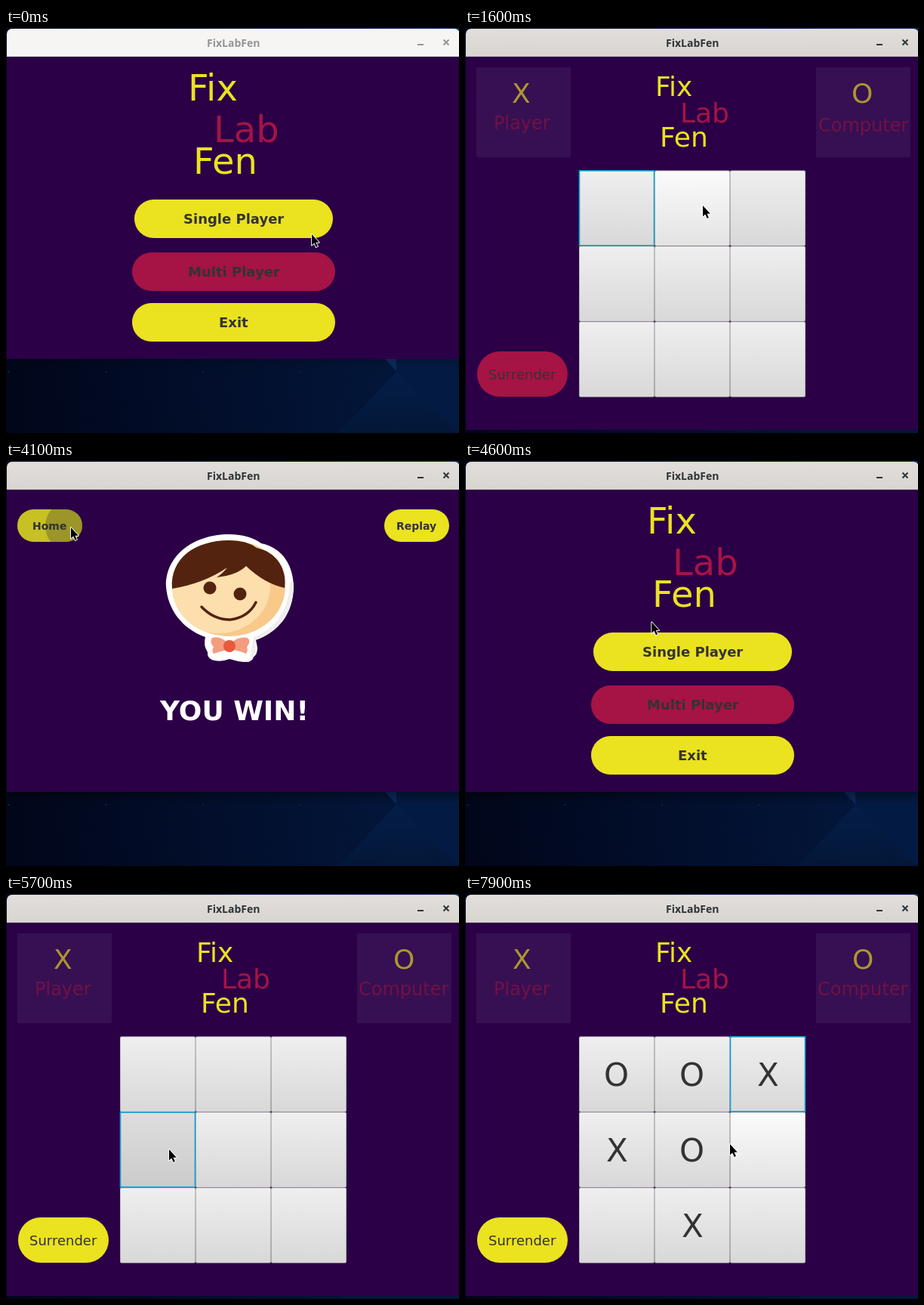
These frames come from a looping animation (600 px wide and 536 px high, 8 s). An HTML page with a canvas:

```html
<!DOCTYPE html>
<html lang="en">
<head>
<meta charset="utf-8">
<title>FixLabFen</title>
<style>
html, body { margin: 0; width: 100%; height: 100%; overflow: hidden; background: #010a20; }
canvas { display: block; width: 600px; height: 536px; }
</style>
</head>
<body>
<canvas id="stage" width="600" height="536"></canvas>
<script>
const c = document.getElementById('stage').getContext('2d');
const LOOP = 8000, STEP = 100;
const YELLOW = '#ebe220', RED = '#a61345', INK = '#333333', PURPLE = '#2b0047';
const WORDS = ['Fix', 'Lab', 'Fen'];
const SANS = '"DejaVu Sans", sans-serif';

// Pointer stops: time, x, y
const POINTER = [
  [0, 404, 271], [200, 394, 258], [600, 394, 258], [1000, 326, 228], [1300, 320, 226],
  [1600, 314, 233], [1900, 214, 250], [2000, 214, 262], [2100, 215, 289], [2400, 400, 437],
  [2700, 400, 437], [3100, 311, 372], [3400, 311, 372], [4000, 85, 86], [4300, 85, 86],
  [4700, 300, 253], [4900, 300, 253], [5200, 295, 296], [5400, 295, 296], [5700, 215, 336],
  [6100, 215, 336], [6500, 290, 432], [6700, 290, 432], [7000, 264, 432], [7100, 258, 429],
  [7200, 258, 429], [7500, 394, 240], [7700, 394, 240], [7900, 350, 329], [8000, 350, 329]
];
const SCENES = [
  [0, menu], [600, levels], [1400, game1], [3300, win],
  [4200, menu], [4900, levels], [5500, game2]
];
// Moves: time, cell, mark
const GAME1 = [[2000, 0, 'X'], [2100, 1, 'O'], [2700, 8, 'X'], [2800, 2, 'O']];
const GAME2 = [[5800, 3, 'X'], [5900, 0, 'O'], [6700, 7, 'X'], [6800, 1, 'O'], [7700, 2, 'X'], [7800, 4, 'O']];
// Cell presses: time, cell
const PRESS1 = [[1900, 0], [2600, 8], [3200, 4]];
const PRESS2 = [[5700, 3], [6600, 7], [7600, 2]];
// Pill presses: start, end
const TAPS = [[400, 600], [1200, 1400], [4000, 4200], [4700, 4900], [5300, 5500]];

let now = 0, mouse = { x: 0, y: 0 };

function pointerAt(t) {
  const i = Math.max(1, POINTER.findIndex(p => p[0] > t));
  const [t0, x0, y0] = POINTER[i - 1], [t1, x1, y1] = POINTER[i];
  const k = (t - t0) / (t1 - t0);
  return { x: x0 + (x1 - x0) * k, y: y0 + (y1 - y0) * k };
}

function rect(x, y, w, h, fill) {
  c.fillStyle = fill;
  c.fillRect(x, y, w, h);
}

function round(x, y, w, h, r, fill) {
  c.fillStyle = fill;
  c.beginPath();
  c.roundRect(x, y, w, h, r);
  c.fill();
}

function disc(x, y, r, fill, ry = r) {
  c.fillStyle = fill;
  c.beginPath();
  c.ellipse(x, y, r, ry, 0, 0, 7);
  c.fill();
}

function shape(d, fill, stroke, width) {
  const p = new Path2D(d);
  if (stroke) {
    c.strokeStyle = stroke;
    c.lineWidth = width;
    c.stroke(p);
  }
  if (fill) {
    c.fillStyle = fill;
    c.fill(p);
  }
}

function text(s, x, y, size, fill, weight = '', font = SANS) {
  c.font = `${weight} ${size}px ${font}`;
  c.fillStyle = fill;
  c.fillText(s, x, y);
}

// Centred text starts on a whole pixel
function label(s, x, y, size, fill, weight = '', font = SANS) {
  c.font = `${weight} ${size}px ${font}`;
  text(s, Math.round(x - c.measureText(s).width / 2), y, size, fill, weight, font);
}

function blend(x0, y0, x1, y1, ...tones) {
  const g = c.createLinearGradient(x0, y0, x1, y1);
  tones.forEach((tone, i) => g.addColorStop(i / (tones.length - 1), tone));
  return g;
}

function fade(y0, y1, from, to) {
  return blend(0, y0, 0, y1, from, to);
}

function pill(name, x0, y0, x1, y1, fill, size = 18, weight = 'bold') {
  const w = x1 - x0, h = y1 - y0;
  round(x0, y0, w, h, h / 2, fill);
  const tap = TAPS.find(p => now >= p[0] && now < p[1]);
  const over = mouse.x > x0 && mouse.x < x1 && mouse.y > y0 && mouse.y < y1;
  if (tap && over) {
    c.save();
    c.beginPath();
    c.roundRect(x0, y0, w, h, h / 2);
    c.clip();
    rect(x0, y0, w, h, 'rgba(51,51,51,.19)');
    disc(mouse.x, mouse.y, 2 + (now - tap[0]) * .31, 'rgba(51,51,51,.3)');
    c.restore();
  }
  label(name, (x0 + x1) / 2, Math.ceil((y0 + y1) / 2 + size * .37 - .5), size, INK, weight);
}

function desktop() {
  rect(0, 0, 600, 536, blend(0, 500, 600, 440, '#01061a', '#020f2d', '#03193f'));
  rect(0, 0, 600, 12, blend(0, 0, 600, 0, '#020a20', '#0d2e66'));
  rect(517, 438, 83, 98, '#031a42');
  shape('M517 455L600 536H440Z', fade(455, 536, '#051e48', '#031738'));
  shape('M502 438H517V454Z', '#0d2b5f');
  for (let x = 3; x < 400; x += 128.6) rect(x, 454, 1.5, 1.5, '#203252');
}

function frame(bottom, active) {
  if (bottom < 500) {
    rect(1, bottom, 599, 16, fade(bottom, bottom + 16, `rgba(0,0,0,${active ? .35 : .15})`, 'rgba(0,0,0,0)'));
  }
  rect(1, 38, 599, bottom - 38, PURPLE);
  round(1, 1, 600, 37, [7, 7, 0, 0], active ? fade(1, 38, '#e1dedb', '#d9d5d1') : '#f6f5f4');
  rect(1, 37, 599, 1, active ? '#c4beb8' : '#dedbd7');
  const ink = active ? '#2e3436' : '#929595';
  label('FixLabFen', 301, 25, 14, ink, 'bold', '"Open Sans", sans-serif');
  rect(545, 21, 8, 2, ink);
  shape('M579.5 15.5l7 7M586.5 15.5l-7 7', null, ink, 2);
}

function logo(size, spots) {
  spots.forEach(([x, y], i) => text(WORDS[i], x, y, size, i === 1 ? RED : YELLOW));
}

function menu() {
  frame(438, now >= 400);
  logo(48, [[241, 96], [275, 151], [248, 193]]);
  pill('Single Player', 170, 227, 433, 278, YELLOW);
  pill('Multi Player', 167, 297, 436, 348, RED);
  pill('Exit', 167, 364, 436, 415, YELLOW);
}

function levels() {
  frame(438, true);
  pill('Back', 19, 52, 127, 104, YELLOW);
  text('Select Dificulty', 158, 135, 36, '#ffffff', 'bold');
  rect(168, 161, 202, 1.5, '#8d782f');
  pill('Easy', 150, 199, 418, 251, YELLOW);
  pill('Medium', 156, 271, 418, 322, RED);
  pill('Hard', 155, 347, 418, 399, YELLOW);
  rustyBot();
  tealBot();
  greenBot();
}

function rustyBot() {
  shape('M148 212L140 220L131 223M135 222L129 221M134 223L131 228', null, '#b58574', 3);
  shape('M174 219Q180 225 177 239', null, '#4a4a55', 6);
  for (let y = 221; y < 238; y += 4) rect(173, y, 8, 1, '#8d8a75');
  c.save();
  c.translate(160, 198);
  c.rotate(-.13);
  round(-11, -9, 23, 19, 2, '#8f97a8');
  rect(-12, -12, 9, 3, '#686f80');
  rect(9, -15, 2, 6, '#686f80');
  disc(5, -2, 5, '#5c4b51');
  disc(5, -2, 3, '#d93136');
  disc(-6, -2, 2, '#433e48');
  rect(-6, 5, 13, 2, '#4c5262');
  c.restore();
  shape('M148 211L172 209L173 236L146 239Z', '#66562d');
  for (let y = 213; y < 231; y += 4) rect(153, y, 8, 2.5, '#c4b52b');
  round(162, 216, 10, 13, 1, '#ab8a32');
  rect(164, 219, 6, 2, '#453d29');
  disc(167, 225, 2, '#5e4b2b');
  rect(150, 238, 5, 7, '#8b6e2e');
  rect(163, 236, 5, 9, '#8b6e2e');
  round(144, 244, 14, 5, 2, '#6c552b');
  round(161, 243, 13, 5, 2, '#6c552b');
}

function tealBot() {
  rect(158.5, 254, 1.5, 8, '#75776a');
  disc(159, 253, 1.5, '#e3c743');
  shape('M146 283L142 290V300', null, '#68b5a2', 4);
  shape('M174 285L178 279V270', null, '#d94b40', 4);
  rect(140, 299, 5, 5, '#c54a43');
  rect(175, 265, 5, 5, '#64b29f');
  round(147, 261, 25, 18, 2, '#56b7a0');
  for (const x of [154, 165]) {
    disc(x, 268, 4, '#e55343');
    disc(x, 268, 2, '#ffe9c4');
  }
  rect(152, 274, 15, 2, '#1f6862');
  rect(155, 278, 9, 3, '#337d74');
  round(145, 280, 30, 27, 2, '#56b7a0');
  disc(159, 289, 6, '#56351f', 5);
  shape('M159 289L155 287M159 289L162 287', null, '#f1c24c', 1.5);
  rect(151, 299, 17, 3, '#338175');
  for (const x of [149, 163]) {
    rect(x, 307, 7, 8, '#e4bd48');
    rect(x, 310, 7, 2, '#d74b3c');
    round(x - 2, 315, 11, 6, 2, '#56b7a0');
  }
}

function greenBot() {
  round(149, 339, 16, 14, 2, '#89a526');
  rect(151, 343, 12, 4, '#35332c');
  rect(152, 344, 3, 2, '#e54a50');
  rect(159, 344, 3, 2, '#e54a50');
  rect(153, 350, 8, 1, '#4c6a1f');
  rect(154, 353, 6, 2, '#5d283d');
  shape('M144 360L139 366V377M171 360L175 366V377', null, '#6e193e', 4);
  rect(136, 358, 8, 6, '#89a526');
  rect(170, 358, 8, 6, '#89a526');
  rect(137, 376, 5, 5, '#892143');
  rect(173, 376, 5, 5, '#892143');
  round(144, 354, 28, 16, 3, '#89a526');
  rect(148, 357, 18, 7, '#65aeb9');
  rect(152, 370, 11, 6, '#597a27');
  shape('M153 375L151 392M162 375L165 392', null, '#6e193e', 5);
  disc(152, 384, 3, '#89a526');
  disc(163, 384, 3, '#89a526');
  round(146, 392, 10, 6, 2, '#89a526');
  round(160, 391, 9, 6, 2, '#89a526');
}

function win() {
  frame(438, true);
  pill('Home', 15, 64, 101, 107, YELLOW, 14);
  pill('Replay', 501, 64, 587, 107, YELLOW, 14);
  boy();
  text('YOU WIN!', 204, 343, 36, '#ffffff', 'bold');
}

function boy() {
  const rim = 'M212 166C211 124 250 97 295 97C315 97 329 102 338 109C367 115 381 139 381 168C380 202 361 226 331 237L333 247Q333 256 328 259Q326 267 315 266Q305 265 296 262Q286 266 276 264Q266 262 267 253Q261 244 264 233C233 222 214 196 212 166Z';
  shape(rim, '#ffffff');
  c.save();
  c.clip(new Path2D(rim));
  shape('M381 160C381 215 350 236 331 236L330 266H312Q327 263 324 256L328 233C352 224 374 204 376 160Z', '#f0efee');
  c.restore();
  const face = 'M220 168C220 130 254 105 296 105C338 105 370 132 370 168C368 207 333 232 296 232C257 232 222 207 220 168Z';
  shape(face, '#f9c98a');
  c.save();
  c.clip(new Path2D(face));
  disc(282, 166, 68, '#fddead', 62);
  c.restore();
  shape('M220 169C217 129 250 105 296 105Q319 105 332 115C358 120 373 143 369 168Q342 162 318 139Q306 151 279 154Q288 148 293 141Q262 162 220 169Z', '#53230f');
  disc(270, 168, 8.5, '#53230f');
  disc(310, 176, 8.5, '#53230f');
  c.lineCap = 'round';
  shape('M259 193Q275 210 297 210Q321 207 331 187', null, '#53230f', 3.5);
  c.lineCap = 'butt';
  shape('M273 234Q283 231 293 240V250Q283 252 275 255Q272 251 275 246Q269 240 273 234Z', '#f49c80');
  shape('M320 234Q309 232 299 240V250Q310 251 318 255Q321 251 319 246Q325 239 320 234Z', '#f49c80');
  disc(296, 245, 8, '#e9593d');
}

function cell(i, mark, hot, down, focus) {
  const x = 151 + i % 3 * 100, y = 188.6 + Math.floor(i / 3) * 100;
  round(x, y, 100, 100, 2, fade(y, y + 100, '#c1c1c1', '#a8a8a8'));
  const tone = down ? ['#dedede', '#cbcbcb'] : hot ? ['#fbfbfb', '#e3e3e3'] : ['#efefef', '#d8d8d8'];
  round(x + 1, y + 1, 98, 98, 1.5, down ? tone[0] : '#f8f8f8');
  round(x + 1, y + 2, 98, 97, 1.5, fade(y, y + 100, ...tone));
  if (mark) label(mark, x + 50, Math.round(y + 65.4), 42, INK);
  if (focus) {
    c.strokeStyle = '#139ed1';
    c.lineWidth = 1.6;
    c.strokeRect(x + .5, y + .3, 99, 99);
  }
}

function game(moves, presses, red, dx, drop) {
  frame(532, true);
  rect(15, 52, 125, 119, '#361052');
  rect(465, 52, 125, 119, '#361052');
  const dim = '#ab9731', wine = '#731045';
  label('X', 74.5 + dx, 99, 36, dim);
  label('O', 526 + dx, 99, 36, dim);
  label('Player', 75.5, 134, 24, wine);
  label('Computer', 527.5 - dx, 134 + drop, 24, wine);
  logo(36, [[252, 90], [285, 125], [258, 157]]);
  pill('Surrender', 16, 428, 136, 488, red ? RED : YELLOW, 18, '');

  const col = Math.floor((mouse.x - 150) / 100), row = Math.floor((mouse.y - 188) / 100);
  const hot = col >= 0 && col < 3 && row >= 0 && row < 3 ? row * 3 + col : -1;
  const down = presses.find(p => now >= p[0] && now < p[0] + STEP);
  const last = presses.filter(p => now >= p[0]).pop();
  const focus = last ? last[1] : 0;
  const order = [...Array(9).keys()].sort((a, b) => (a === focus) - (b === focus));
  for (const i of order) {
    const move = moves.find(m => m[1] === i && now >= m[0]);
    cell(i, move && move[2], i === hot, down && down[1] === i, i === focus);
  }
}

function game1() { game(GAME1, PRESS1, true, 0, 3); }
function game2() { game(GAME2, PRESS2, false, 1, 0); }

function pointer() {
  c.save();
  c.translate(mouse.x + 1, mouse.y + 2);
  c.lineJoin = 'round';
  shape('M0 0V14.5L3.2 11.6L5.7 17L7.9 16L5.5 10.8H9.8Z', '#000000', '#ffffff', 1.8);
  c.restore();
}

function draw(ms) {
  now = Math.floor(ms % LOOP / STEP) * STEP;
  mouse = pointerAt(now);
  desktop();
  SCENES.filter(s => now >= s[0]).pop()[1]();
  pointer();
}

function tick() {
  draw(performance.now());
  requestAnimationFrame(tick);
}
tick();
</script>
</body>
</html>
```
